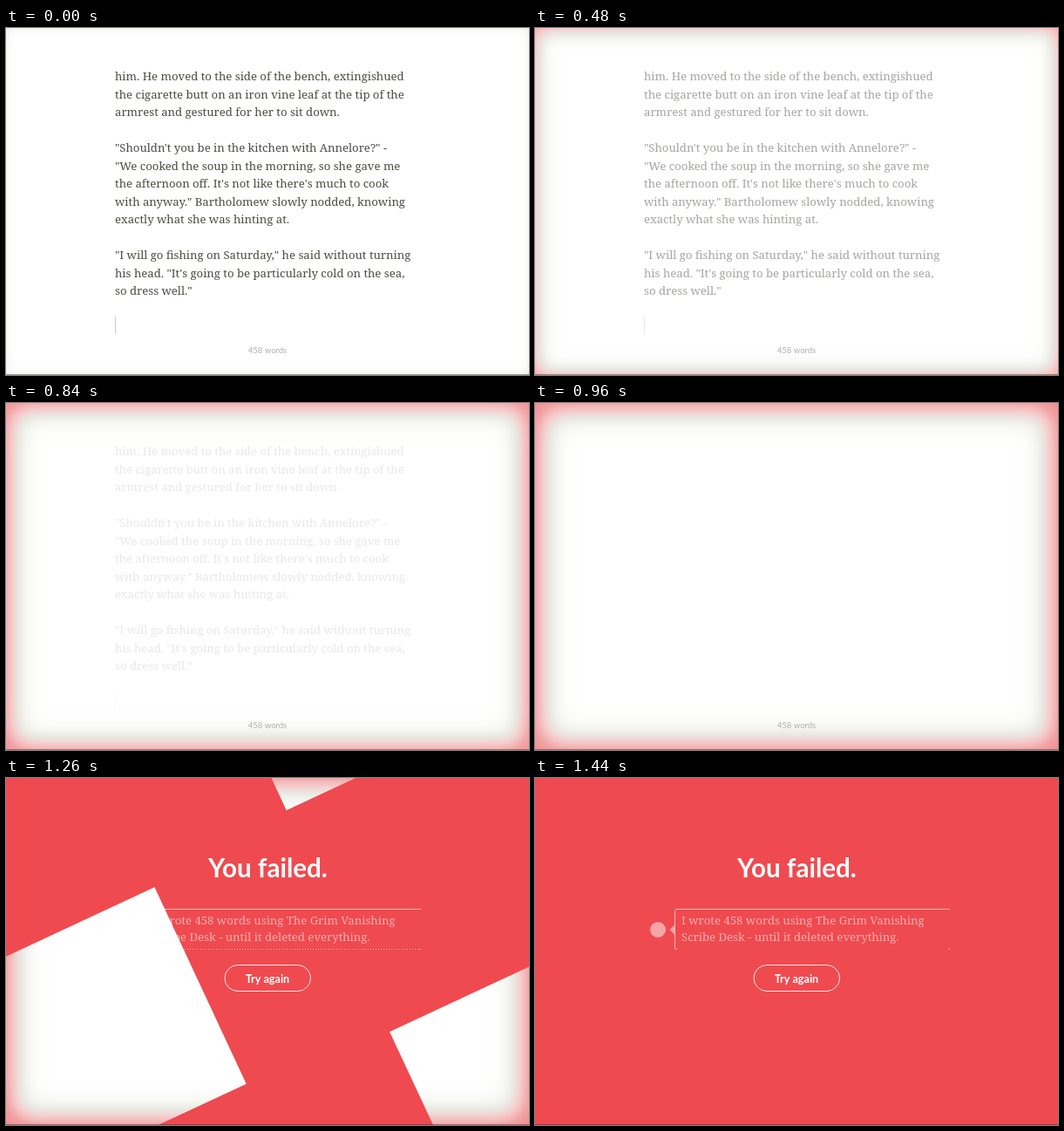
An HTML page with a canvas for the animation above (2640 ms loop, 600 px wide and 398 px high).

```html
<!DOCTYPE html>
<html lang="en">
<head>
<meta charset="utf-8">
<title>You failed</title>
<style>
  html, body { margin: 0; width: 100%; height: 100%; overflow: hidden; background: #fff; }
  canvas { display: block; }
</style>
</head>
<body>
<canvas id="stage" width="600" height="398"></canvas>
<script>
const W = 600, H = 398, LOOP = 2640, STEP = 60, LAST = 1440;
const FADE = 960, WIPE = 1140;
const RED = '#ef4a4f';
const SERIF = '13.15px "Noto Serif", serif', SANS = 'Lato, sans-serif';

const ctx = document.getElementById('stage').getContext('2d');
const glow = ctx.createImageData(W, H);

const story = [
  'him. He moved to the side of the bench, extingishued',
  'the cigarette butt on an iron vine leaf at the tip of the',
  'armrest and gestured for her to sit down.',
  '',
  '"Shouldn\'t you be in the kitchen with Annelore?" -',
  '"We cooked the soup in the morning, so she gave me',
  'the afternoon off. It\'s not like there\'s much to cook',
  'with anyway." Bartholomew slowly nodded, knowing',
  'exactly what she was hinting at.',
  '',
  '"I will go fishing on Saturday," he said without turning',
  'his head. "It\'s going to be particularly cold on the sea,',
  'so dress well."'
];

// Glow strength -> colour
const ramp = [
  [0, 255, 255, 255], [.03, 251, 251, 249], [.08, 243, 243, 239],
  [.14, 234, 233, 228], [.2, 239, 220, 217], [.27, 245, 203, 203],
  [.45, 242, 163, 165], [.7, 240, 138, 141], [1, 239, 74, 79]
];
const palette = Array.from({ length: 256 }, (_, i) => {
  const v = i / 255;
  const k = Math.max(1, ramp.findIndex(s => s[0] >= v));
  const a = ramp[k - 1], b = ramp[k];
  const f = (v - a[0]) / (b[0] - a[0]);
  return [1, 2, 3].map(c => a[c] + (b[c] - a[c]) * f);
});

function text(str, x, y, font, color, align = 'left') {
  ctx.font = font;
  ctx.fillStyle = color;
  ctx.textAlign = align;
  ctx.fillText(str, x, y);
}

const white = a => `rgba(255,255,255,${a})`;

// Gaussian cumulative distribution
const cdf = z => .5 * (1 + Math.tanh(.7979 * z + .0357 * z ** 3));

const coverage = (size, sigma) => Float32Array.from({ length: size },
  (_, i) => cdf((i + .5) / sigma) * cdf((size - i - .5) / sigma));

function drawGlow(t) {
  const p = Math.min(t / FADE, 1);
  const sigma = 5.3 + 13 * p;
  const peak = 2 * (.08 + .36 * p);
  const cols = coverage(W, sigma), rows = coverage(H, sigma);
  let i = 0;
  for (let y = 0; y < H; y++) {
    for (let x = 0; x < W; x++) {
      const c = palette[Math.round(255 * peak * (1 - cols[x] * rows[y]))];
      glow.data[i++] = c[0];
      glow.data[i++] = c[1];
      glow.data[i++] = c[2];
      glow.data[i++] = 255;
    }
  }
  ctx.putImageData(glow, 0, 0);
}

function drawStory(t) {
  const alpha = Math.max(0, 1 - t / FADE);
  if (alpha) {
    ctx.globalAlpha = alpha;
    story.forEach((line, i) => text(line, 125, 60 + 20.5 * i, SERIF, '#4c4b45'));
    ctx.fillStyle = '#cccbc6';
    ctx.fillRect(125, 331, 1, 20);
    ctx.globalAlpha = 1;
  }
  text('458 words', 300, 373, '9.5px ' + SANS, '#b0afab', 'center');
}

// Three slanted bars: the outer two slide right, the middle one left
function drawWipe(t) {
  const shift = (t - WIPE) / STEP * 139.2;
  const left = -2.5 + shift, right = 380 - shift;
  ctx.save();
  ctx.rotate(-25 * Math.PI / 180);
  ctx.fillStyle = RED;
  ctx.fillRect(-900, -400, left + 900, 585.5);
  ctx.fillRect(-900, 434.5, left + 900, 600);
  ctx.fillRect(right, 169.5, 1500, 280.3);
  ctx.restore();
}

function drawQuote(t) {
  ctx.fillStyle = white(.5);
  ctx.beginPath();
  ctx.arc(141, 174, 9, 0, 7);
  ctx.fill();
  ctx.beginPath();
  ctx.moveTo(160, 168.5);
  ctx.lineTo(154.5, 174);
  ctx.lineTo(160, 179.5);
  ctx.fill();

  ctx.lineWidth = 1;
  ctx.strokeStyle = white(.6);
  ctx.beginPath();
  ctx.moveTo(476, 150.5);
  ctx.lineTo(162.5, 150.5);
  ctx.quadraticCurveTo(160.5, 150.5, 160.5, 152.5);
  ctx.lineTo(160.5, 194.5);
  ctx.quadraticCurveTo(160.5, 196.5, 163, 196.5);
  ctx.moveTo(474, 196.5);
  ctx.lineTo(476, 196.5);
  ctx.stroke();
  if (t < LAST) {
    ctx.setLineDash([1, 2]);
    ctx.beginPath();
    ctx.moveTo(163, 196.5);
    ctx.lineTo(476, 196.5);
    ctx.stroke();
    ctx.setLineDash([]);
  }
  text('I wrote 458 words using The Grim Vanishing', 168, 168, SERIF, white(.55));
  text('Scribe Desk - until it deleted everything.', 168, 186.5, SERIF, white(.55));
}

function drawMessage(t) {
  text('You failed.', 300.5, 114, 'bold 29.6px ' + SANS, '#fff', 'center');
  drawQuote(t);
  ctx.strokeStyle = white(.85);
  ctx.beginPath();
  ctx.roundRect(251, 214.5, 98.5, 30, 15);
  ctx.stroke();
  text('Try again', 300, 234.5, 'bold 12.6px ' + SANS, '#fff', 'center');
}

function draw(t) {
  if (t < LAST) {
    drawGlow(t);
    drawStory(t);
  } else {
    ctx.fillStyle = RED;
    ctx.fillRect(0, 0, W, H);
  }
  if (t >= WIPE) {
    drawWipe(t);
    drawMessage(t);
  }
  ctx.fillStyle = 'rgba(70,35,25,.45)';
  ctx.fillRect(0, H - 1, W, 1);
}

let shown = -1;
const start = performance.now();
function tick() {
  const now = (performance.now() - start) % LOOP;
  const t = Math.min(Math.floor(now / STEP) * STEP, LAST);
  if (t !== shown) draw(shown = t);
  requestAnimationFrame(tick);
}
tick();
</script>
</body>
</html>
```
